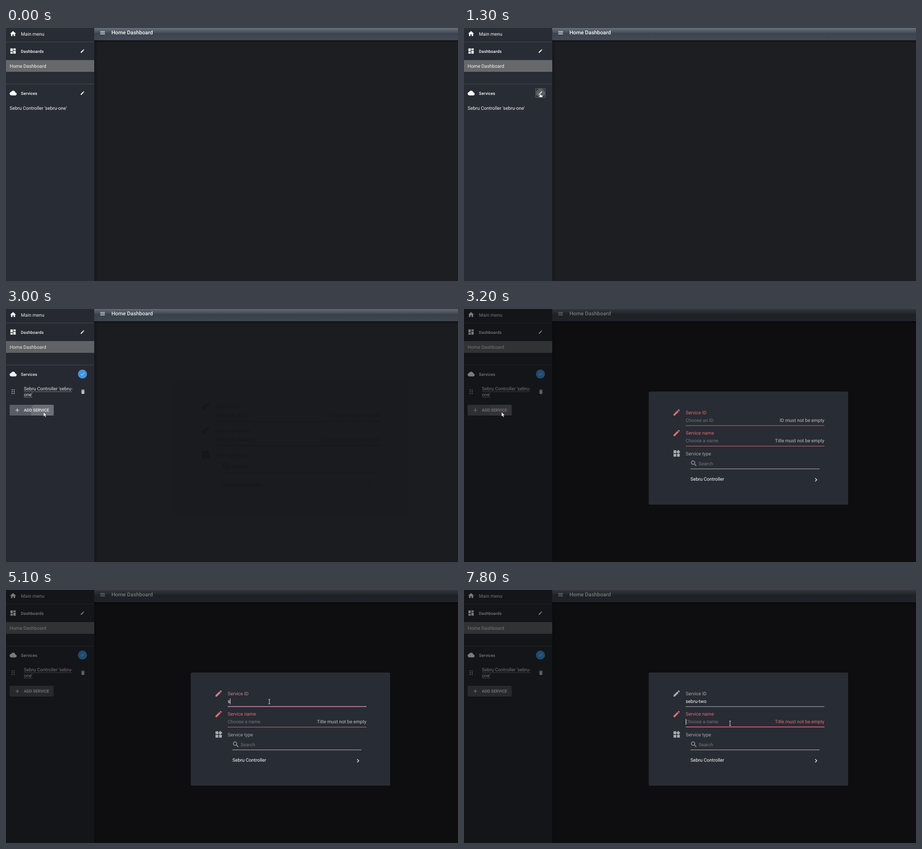
An HTML page that plays this animation: 999 by 560 pixels, repeating every 8 s.

```html
<!DOCTYPE html>
<html lang="en">
<head>
<meta charset="utf-8">
<title>Add service</title>
<style>
html, body { margin: 0; width: 100%; height: 100%; overflow: hidden; background: #1d1e21; }
svg { display: block; width: 999px; height: 560px; }
text { font: 10.4px Roboto, sans-serif; text-rendering: geometricPrecision; white-space: pre; }
.head { font-size: 9.1px; font-weight: 500; letter-spacing: .16px; }
.btn { font-size: 9.1px; font-weight: 500; }
.title { font-size: 11.7px; font-weight: 500; letter-spacing: .05px; }
.ghost text, .ghost path, .ghost rect { fill: #000; }
.ghost .panel { fill: #191a1d; }
</style>
</head>
<body>
<svg id="stage" viewBox="0 0 999 560"></svg>
<script>
const LOOP = 8000;
const RED = [224, 108, 117], BLUE = [104, 165, 232], GREY = [168, 170, 173], LINE = [190, 192, 195];
const PRODUCT = 'Sebru Controller', OLD_ID = 'sebru-one', NEW_ID = 'sebru-two';

// 24-unit icon outlines
const ICONS = {
  home: 'M10 20v-6h4v6h5v-8h3L12 3 2 12h3v8z',
  board: 'M3 13h8V3H3zM3 21h8v-6H3zM13 21h8V11h-8zM13 3v6h8V3z',
  cloud: 'M19.35 10.04C18.67 6.59 15.64 4 12 4 9.11 4 6.6 5.64 5.35 8.04 2.34 8.36 0 10.91 0 14c0 3.31 2.69 6 6 6h13c2.76 0 5-2.24 5-5 0-2.64-2.05-4.78-4.65-4.96z',
  edit: 'M3 17.25V21h3.75L17.81 9.94l-3.75-3.75zM20.71 7.04a1 1 0 0 0 0-1.41l-2.34-2.34a1 1 0 0 0-1.41 0l-1.83 1.83 3.75 3.75z',
  menu: 'M3 18h18v-2H3zM3 13h18v-2H3zM3 6v2h18V6z',
  bin: 'M6 19c0 1.1.9 2 2 2h8c1.1 0 2-.9 2-2V7H6zM19 4h-3.5l-1-1h-5l-1 1H5v2h14z',
  check: 'M9 16.17L4.83 12l-1.42 1.41L9 19 21 7l-1.41-1.41z',
  plus: 'M19 13h-6v6h-2v-6H5v-2h6V5h2v6h6z',
  widgets: 'M13 13v8h8v-8zM3 21h8v-8H3zM3 3v8h8V3zM16.66 1.69L11 7.34 16.66 13l5.66-5.66z',
  search: 'M15.5 14h-.79l-.28-.27a6.5 6.5 0 1 0-.7.7l.27.28v.79l5 4.99L20.49 19zm-6 0a4.5 4.5 0 1 1 0-9 4.5 4.5 0 0 1 0 9z',
  next: 'M10 6L8.59 7.41 13.17 12l-4.58 4.59L10 18l6-6z'
};

const icon = (name, cx, cy, size, fill = '#fff', id = '') =>
  `<path id="${id}" d="${ICONS[name]}" fill="${fill}" transform="translate(${cx - size / 2} ${cy - size / 2}) scale(${size / 24})"/>`;
// cy is the middle of the capitals
const label = (s, x, cy, fill = '#f6f6f6', extra = '') =>
  `<text x="${x}" y="${cy + 3.7}" fill="${fill}" ${extra}>${s}</text>`;
const rect = (x, y, w, h, fill, extra = '') =>
  `<rect x="${x}" y="${y}" width="${w}" height="${h}" fill="${fill}" ${extra}/>`;
const rgb = c => `rgb(${c.map(Math.round)})`;
const stops = list => list.map(([o, c, a]) => `<stop offset="${o}" stop-color="${c}" stop-opacity="${a}"/>`).join('');

const defs = `<defs>
  <linearGradient id="gloss" gradientUnits="userSpaceOnUse" x1="0" y1="-5.5" x2="0" y2="27">
    ${stops([[0, '#fff', .3], [.5, '#fff', 0], [.51, '#000', .12], [1, '#000', .04]])}</linearGradient>
  <linearGradient id="down" x2="0" y2="1">${stops([[0, '#000', .35], [1, '#000', 0]])}</linearGradient>
  <linearGradient id="right">${stops([[0, '#000', .22], [1, '#000', 0]])}</linearGradient>
  <clipPath id="btnClip"><rect x="8" y="212" width="97.5" height="24" rx="2"/></clipPath>
</defs>`;

const dots = [179, 183, 187].map(y => [13.6, 18].map(x =>
  `<circle cx="${x}" cy="${y}" r="1.25" fill="#b4b6b9"/>`).join('')).join('');

const page = rect(0, 0, 999, 560, '#1d1e21') +
  rect(195, 0, 804, 27, '#454d59') + rect(195, 0, 804, 27, 'url(#gloss)') +
  rect(195, 27, 804, 6, 'url(#down)') + rect(195, 27, 9, 533, 'url(#right)') +
  icon('menu', 213.5, 10.5, 13.65) + label('Home Dashboard', 233, 10.5, '#fff', 'class="title"') +
  rect(0, 0, 195, 560, '#282c34') +
  icon('home', 15.6, 12.6, 15.6) + label('Main menu', 33, 13) +
  rect(0, 30.6, 195, .8, '#50545b') + rect(0, 123.6, 195, .8, '#50545b') +
  icon('board', 15.6, 51, 15.6) + label('Dashboards', 33, 51, '#fff', 'class="head"') + icon('edit', 169, 51, 10.4) +
  rect(0, 71, 195, 26, '#67686b') + label('Home Dashboard', 8, 84) +
  icon('cloud', 15.8, 144, 15.6) + label('Services', 33, 144, '#fff', 'class="head"') +
  `<g id="viewing">` + rect(0, 164, 195, 26, '#fff', 'id="itemHover" opacity=".1"') +
  label(`${PRODUCT} '${OLD_ID}'`, 8, 177) +
  `<circle id="editHover" cx="169" cy="144" r="10" fill="#fff"/>` + icon('edit', 169, 144, 10.4) +
  rect(158.5, 134, 21, 20, 'none', 'id="editRing" stroke="#74777c" stroke-width=".8"') + `</g>` +
  `<g id="editing"><circle cx="169" cy="144" r="10" fill="#459eee"/>` + icon('check', 169, 144, 10.4) +
  `<circle id="checkGlow" cx="169" cy="144" r="10" fill="#fff" opacity=".12"/>` +
  dots + label(`${PRODUCT} '${OLD_ID.slice(0, 6)}`, 39.5, 176.7) + label(`${OLD_ID.slice(6)}'`, 39.5, 189) +
  rect(39.5, 182.6, 106.5, .8, '#a0a2a6') + rect(39.5, 194.8, 19, .8, '#a0a2a6') +
  icon('bin', 170, 183, 13, '#c8c9cb') +
  rect(8, 213, 97.5, 24, '#000', 'rx="2" opacity=".3"') + rect(8, 212, 97.5, 24, '#51555e', 'rx="2"') +
  `<g clip-path="url(#btnClip)">` + rect(8, 212, 98, 24, '#fff', 'id="addHover" opacity=".08"') +
  `<circle id="ripple" cx="83" cy="228" fill="#fff"/></g>` +
  rect(7.5, 211.5, 98.5, 25, 'none', 'id="addRing" stroke="#8a8c90" stroke-width=".8"') +
  icon('plus', 25, 224, 13.65) + label('ADD SERVICE', 39.5, 223.7, '#fff', 'class="btn"') + `</g>`;

const field = (key, cy, name, hint, error) =>
  icon('edit', 470, cy, 18.6, '', key + 'Icon') + label(name, 490, cy, '', `id="${key}Label"`) +
  label(hint, 490, cy + 17.2, '#71757c', `id="${key}Hint"`) +
  label(error, 796.5, cy + 17.2, '', `id="${key}Error" text-anchor="end"`) +
  rect(490, cy + 28.6, 306.5, 1, '', `id="${key}Line"`) + rect(490, cy + 28, 306.5, 1.6, '', `id="${key}Focus"`);

const dialog = `<g id="dialog">` +
  rect(408.3, 182.7, 440.7, 250.3, '#282c34', 'class="panel" rx="2.6"') +
  field('id', 229, 'Service ID', 'Choose an ID', 'ID must not be empty') +
  field('name', 274.4, 'Service name', 'Choose a name', 'Title must not be empty') +
  label('', 490, 246.2, '#fff', 'id="typed"') + rect(0, 0, .9, 13, '#fff', 'id="caret"') +
  icon('widgets', 470, 319.8, 18.6, rgb(GREY)) + label('Service type', 490, 320, rgb(GREY)) +
  icon('search', 508, 341.8, 16.5, rgb(GREY)) + label('Search', 518.5, 342.2, '#71757c') +
  rect(500.5, 353.4, 285.5, 1, rgb(LINE)) +
  label(PRODUCT, 500.5, 376.4, '#fff') + icon('next', 778, 378, 16, '#fff') + `</g>`;

const cursor = `<g id="cursor">
  <path id="arrow" d="M0 0V10L2.3 8 4 11.6 5.6 10.9 4 7.4H7Z" fill="#fff" stroke="#111" stroke-width=".5"/>
  <path id="hand" d="M-1 .8Q0-.6 1 .8V4L4.6 4.8Q5.6 5 5.4 6.4L4.6 9.6H-.6L-3.2 6.4Q-3 5-1 6Z" fill="#fff" stroke="#111" stroke-width=".6"/>
  <path id="beam" d="M-2-5H-.5L0-4.5 .5-5H2M0-4.5V4.5M-2 5H-.5L0 4.5 .5 5H2" fill="none" stroke="#f2f2f2"/></g>`;

const stage = document.getElementById('stage');
stage.innerHTML = defs + page + rect(0, 0, 999, 560, '#000', 'id="shade"') + dialog + cursor;

const el = id => document.getElementById(id);
const set = (id, attrs) => { for (const k in attrs) el(id).setAttribute(k, attrs[k]); };
const show = (id, on) => { el(id).style.display = on ? '' : 'none'; };
const clamp = v => Math.max(0, Math.min(1, v));
const mix = (a, b, k) => rgb(a.map((v, i) => v + (b[i] - v) * k));

// The picture is held between these times
const span = (a, b) => Array.from({ length: (b - a) / 100 + 1 }, (_, i) => a + i * 100);
const TICKS = [...span(0, 1100), ...span(1300, 2400), 2700, 3000, 3200, 3400, 3700, 3900, 4200, 4400,
  4700, 4900, 5100, 5400, 5700, 5900, 6200, 6700, 7000, 7200, 7500, 7800];
const PATH = [[100, 128, 487], [400, 150, 300], [700, 165, 175], [900, 169, 148], [1300, 168.5, 144],
  [1900, 168.5, 144], [2000, 163, 150], [2100, 138, 178], [2200, 112, 203], [2400, 83, 228],
  [3400, 83, 228], [3700, 360, 275], [3900, 545, 290], [4200, 582, 247], [6200, 582, 247],
  [6700, 598, 288], [7000, 598, 288], [7200, 590, 293], [7500, 588, 295]];
const KEYS = [[5100, 1], [5400, 3], [5700, 5], [5900, 7], [6200, 9]];

function pointer(t) {
  const i = PATH.findIndex(p => p[0] > t);
  if (i < 0) return PATH[PATH.length - 1].slice(1);
  if (i === 0) return PATH[0].slice(1);
  const [t0, x0, y0] = PATH[i - 1], [t1, x1, y1] = PATH[i], k = (t - t0) / (t1 - t0);
  return [x0 + (x1 - x0) * k, y0 + (y1 - y0) * k];
}

function paintField(key, main, line, error, focus, width, focusColor) {
  set(key + 'Icon', { fill: main });
  set(key + 'Label', { fill: main });
  set(key + 'Error', { fill: error });
  set(key + 'Line', { fill: line });
  set(key + 'Focus', { fill: focusColor, opacity: focus, x: 643.25 - 153.25 * width, width: 306.5 * width });
}

function draw(t) {
  const [x, y] = pointer(t);
  const overItem = t >= 100 && t < 1300 && y > 164 && y < 190;
  const overEdit = t >= 800 && t < 2000 && y < 155;
  const beam = t >= 3900, hand = overItem || overEdit;

  show('cursor', t >= 100);
  set('cursor', { transform: `translate(${x} ${y})` });
  show('beam', beam);
  show('hand', hand && !beam);
  show('arrow', !hand && !beam);

  show('viewing', t < 1400);
  show('editing', t >= 1400);
  show('itemHover', overItem);
  show('editHover', overEdit);
  set('editHover', { opacity: t >= 1300 ? .24 : .14 });
  show('editRing', t >= 1300);
  show('checkGlow', t < 2700);
  show('addHover', t >= 2400 && t < 3400);
  show('addRing', t === 2700);
  set('ripple', { r: 8 + 20 * clamp((t - 2700) / 300), opacity: t < 2700 ? 0 : .13 * clamp((3400 - t) / 400) });

  const opening = t === 3000;
  set('shade', { opacity: t < 3000 ? 0 : opening ? .06 : .52 });
  show('dialog', t >= 3000);
  set('dialog', {
    class: opening ? 'ghost' : '', opacity: opening ? .2 : 1,
    transform: opening ? 'translate(628.6 308) scale(1.18) translate(-628.6 -308)' : ''
  });

  const valid = clamp((t - 4960) / 360);
  const idOn = clamp((t - 4300) / 360), idOff = clamp((t - 6900) / 360);
  const nameOn = clamp((t - 6900) / 360);
  paintField('id', mix(RED, GREY, valid), mix(RED, LINE, valid), mix(LINE, RED, idOn),
    1 - idOff, idOn, mix(RED, BLUE, valid));
  paintField('name', rgb(RED), rgb(RED), mix(LINE, RED, nameOn), 1, nameOn, rgb(RED));

  const count = KEYS.reduce((n, [at, c]) => t >= at ? c : n, 0);
  el('typed').textContent = NEW_ID.slice(0, count);
  show('idHint', !count);
  show('idError', !count);
  const inName = t >= 7000;
  show('caret', t >= 4400);
  set('caret', {
    x: 490 + (inName || !count ? 0 : el('typed').getComputedTextLength() - .2),
    y: inName ? 285.4 : 240
  });
}

let last = -1;
function loop(now) {
  const t = now % LOOP;
  const tick = TICKS.reduce((a, b) => b <= t ? b : a, 0);
  if (tick !== last) draw(last = tick);
  requestAnimationFrame(loop);
}
draw(0);
requestAnimationFrame(loop);
</script>
</body>
</html>
```
